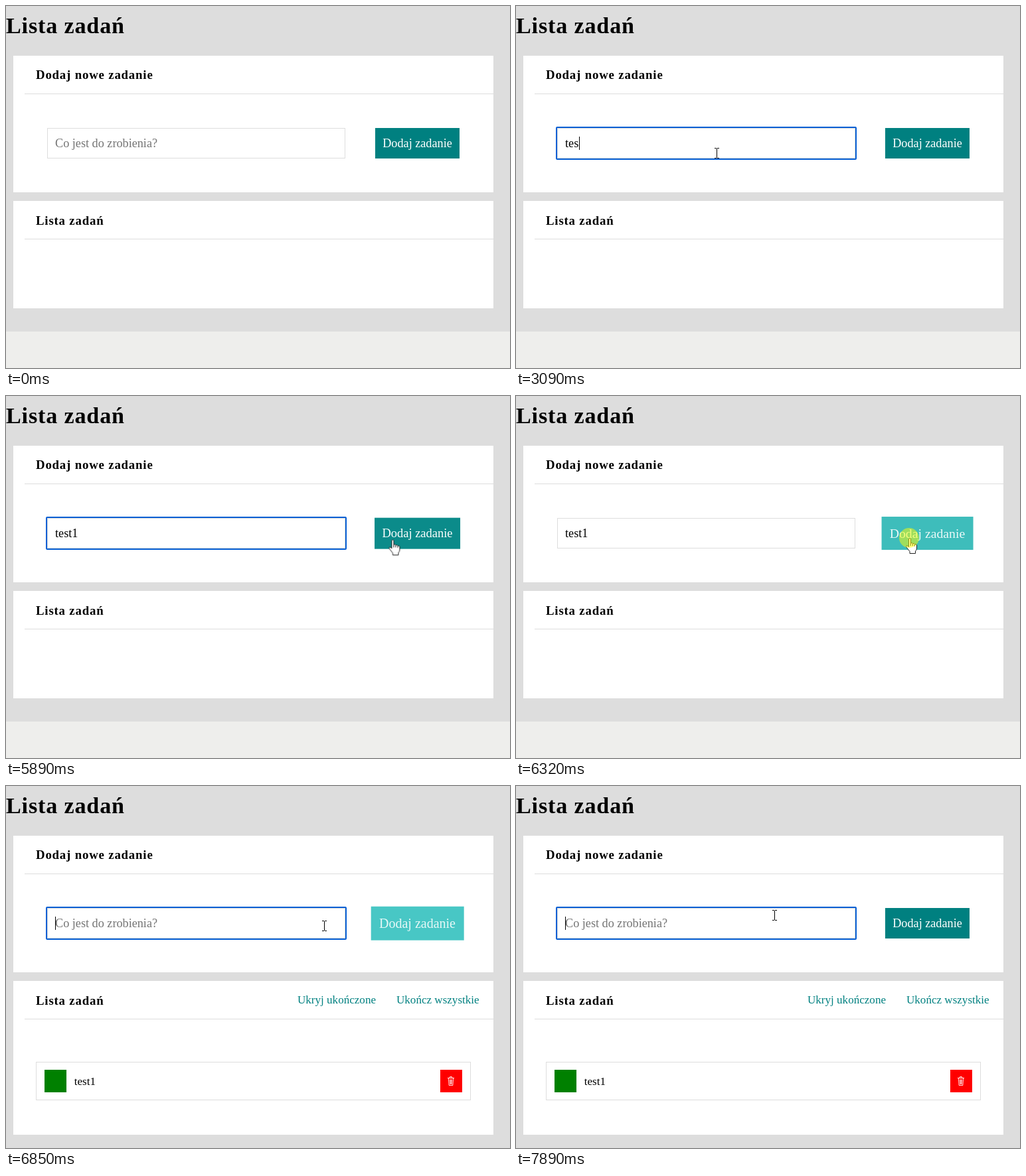
Recreate the animation shown at these times as an HTML page. Size 759 px wide and 546 px high, loop 8 s.

```html
<!DOCTYPE html>
<html lang="pl">
<head>
<meta charset="utf-8">
<title>Lista zadań</title>
<style>
  html, body { margin: 0; width: 100%; height: 100%; overflow: hidden; background: #eeeeec; }
  svg { display: block; font-family: "Liberation Serif", "Times New Roman", serif; }
  h1, .title, .heading { font-weight: bold; }
  .title { font-size: 34.13px; letter-spacing: .83px; }
  .heading { font-size: 18.77px; letter-spacing: .83px; }
  .field { font-size: 18.2px; }
  .item { font-size: 17.07px; }
  .panel { fill: #fff; }
  .box { fill: none; stroke: #ddd; }
  .link { fill: teal; }
  #button { transform-origin: 619.5px 207px; }
</style>
</head>
<body>
<svg width="759" height="546" viewBox="0 0 759 546">
  <rect width="759" height="491" fill="#ddd"/>
  <text class="title" x="0" y="41">Lista zadań</text>

  <rect class="panel" x="11" y="75" width="723" height="206"/>
  <text class="heading" x="45" y="110">Dodaj nowe zadanie</text>
  <path class="box" d="M28 132.5H734"/>

  <rect class="panel" x="11" y="294" width="723" height="162"/>
  <g id="list">
    <rect y="456" width="759" height="90" fill="#ddd"/>
    <rect class="panel" x="11" y="456" width="723" height="70"/>
    <text class="item link" x="439" y="328">Ukryj ukończone</text>
    <text class="item link" x="588" y="328">Ukończ wszystkie</text>
    <rect class="box" x="45.5" y="416.5" width="654" height="57"/>
    <rect x="58" y="428" width="33" height="34" fill="green"/>
    <text class="item" x="102.7" y="451">test1</text>
    <rect x="654" y="428" width="33" height="34" fill="red"/>
    <path d="M665 440.5H675M668.5 440V438.5H671.5V440M666.3 441L667.2 451.5H672.8L673.7 441M668.6 442.5L669 450M670 442.5V450M671.4 442.5L671 450"
          fill="none" stroke="#fff" stroke-width=".9"/>
  </g>
  <text class="heading" x="45" y="330">Lista zadań</text>
  <path class="box" d="M28 351.5H734"/>

  <rect class="box" x="62.5" y="184.5" width="448" height="45"/>
  <rect id="focus" x="61" y="183" width="451" height="48" rx="1" fill="none" stroke="#065fd4" stroke-width="2"/>
  <text id="placeholder" class="field" x="74" y="213" fill="#757575">Co jest do zrobienia?</text>
  <text id="typed" class="field" x="74" y="213"></text>
  <rect id="caret" x="74" y="197" width="1" height="20"/>

  <g id="button">
    <rect id="face" x="556" y="184" width="127" height="46" fill="teal"/>
    <text id="label" class="field" x="619.5" y="213" text-anchor="middle" fill="#fff">Dodaj zadanie</text>
  </g>

  <g id="cursor">
    <path id="arrow" d="M0 0V16L3.8 12.5L6.3 18.3L8.7 17.3L6.2 11.6H11.3Z" fill="#fff" stroke="#000"/>
    <path id="beam" d="M-3 -7.5H0M1 -7.5H4M-3 7.5H0M1 7.5H4M.5 -7V7" fill="none" stroke="#000"/>
    <path id="hand" d="M-.5 1.5Q1 -.5 2.5 1.5V8Q4.5 6.8 5.5 8.6Q7.5 7.6 8.5 9.6Q11 9 11.5 11V16Q11 19 9.5 20V23.5H1V20.5L-4.5 13.5Q-4.5 11 -2 12L-.5 13.5ZM2.5 8V12M5.5 8.6V12M8.5 9.6V12.5"
          fill="#fff" stroke="#222" stroke-width="1"/>
    <circle id="ring" r="15" fill="#ff0" fill-opacity=".5"/>
  </g>
</svg>
<script>
const LOOP = 8000;
const start = document.timeline.currentTime || 0;
const byId = id => document.getElementById(id);

// table rows: [time, value, easing towards the next row]
function play(el, prop, table, easing = 'linear') {
  const rows = [...table, [LOOP, table[table.length - 1][1]]];
  const frames = rows.map(([t, value, ease]) => ({ offset: t / LOOP, [prop]: value, easing: ease || easing }));
  el.animate(frames, { duration: LOOP, iterations: Infinity }).startTime = start;
}

// spans: [from, to] pairs during which the element is seen
function show(el, ...spans) {
  const table = spans.flatMap(([on, off]) => off < LOOP ? [[on, 'visible'], [off, 'hidden']] : [[on, 'visible']]);
  play(el, 'visibility', [[0, 'hidden'], ...table], 'step-end');
}

const move = (x, y = 0) => `translate(${x}px, ${y}px)`;

const CLICK = 1400, BLUR = 6310, SUBMIT = 6380;
show(byId('focus'), [CLICK, BLUR], [SUBMIT, LOOP]);
show(byId('list'), [SUBMIT, LOOP]);
show(byId('placeholder'), [0.01, 2660], [SUBMIT, LOOP]);

[['t', 2660], ['e', 2730], ['s', 3010], ['t', 4080], ['1', 4280]].forEach(([char, time]) => {
  const span = document.createElementNS('http://www.w3.org/2000/svg', 'tspan');
  span.textContent = char;
  byId('typed').append(span);
  show(span, [time, SUBMIT]);
});

show(byId('caret'), [CLICK, 1860], [2460, 3550], [4080, 4620], [5140, 5610], [SUBMIT, 6880], [7400, 7920]);
play(byId('caret'), 'transform', [
  [0, move(0)], [2660, move(5)], [2730, move(14)], [3010, move(21)],
  [4080, move(26)], [4280, move(35)], [SUBMIT, move(0)]
], 'step-end');

// hover fades in and out over one second
const hover = (el, prop, idle, active) => play(el, prop, [
  [0, idle], [5760, idle, 'ease'], [6760, active], [6840, active, 'ease'], [7840, idle]
]);
hover(byId('button'), 'transform', 'scale(1)', 'scale(1.1)');
hover(byId('face'), 'fill', '#008080', '#48c7c5');
hover(byId('label'), 'fill', '#ffffff', '#e6f8f7');

play(byId('cursor'), 'transform', [
  [0, 435, 390], [260, 435, 390], [450, 335, 325], [620, 284, 285], [820, 290, 238], [1000, 302, 222],
  [5070, 302, 222], [5080, 318, 223], [5280, 454, 224], [5600, 454, 224], [5750, 556, 222], [5950, 592, 214],
  [6650, 592, 214], [6790, 562, 212], [6850, 479, 211], [7270, 479, 211], [7600, 402, 187], [7890, 389, 195]
].map(([t, x, y]) => [t, move(x, y)]));
show(byId('arrow'), [260, 860], [5685, 5750]);
show(byId('beam'), [860, 5685], [6810, LOOP]);
show(byId('hand'), [5750, 6810]);
show(byId('ring'), [1330, 1460], [6260, 6440]);
</script>
</body>
</html>
```
